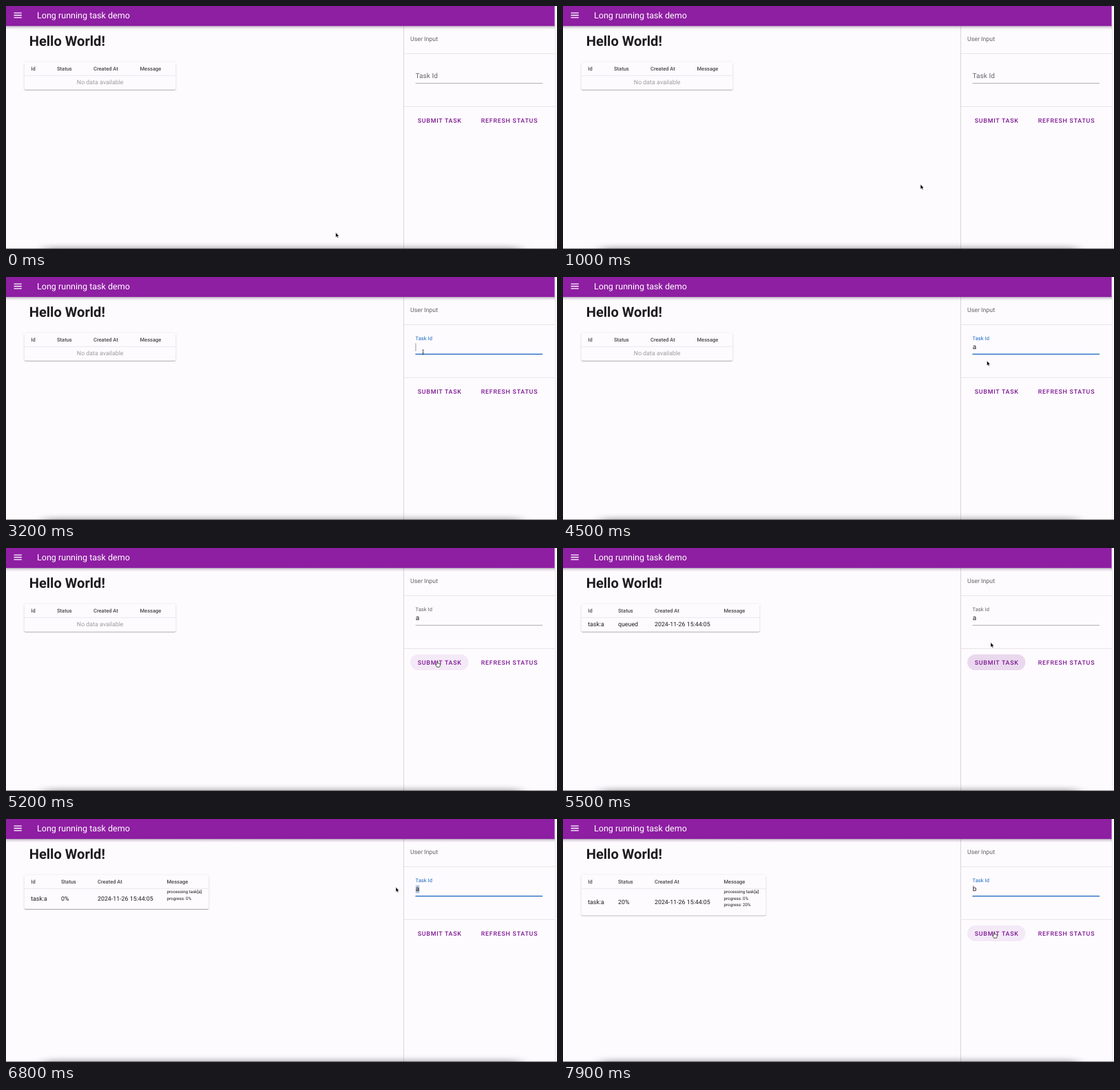
Write an HTML page that moves like this. It is 800 px wide and 354 px high and loops after 8 s.

```html
<!DOCTYPE html>
<html lang="en">
<head>
<meta charset="utf-8">
<title>Long running task demo</title>
<style>
  html, body { margin: 0; width: 100%; height: 100%; overflow: hidden; background: #fefbff; }
  svg { display: block; font: 8.82px Roboto, sans-serif; fill: #1d1b1e; text-rendering: geometricPrecision; }
  .head { font-size: 7.55px; font-weight: 500; fill: #4a474b; }
  .button { font-weight: 500; letter-spacing: .0893em; fill: #7b1690; }
  .field { font-size: 10px; letter-spacing: .0094em; }
  .message { font-size: 6.25px; }
  .rule { stroke: #e8e5e9; }
</style>
</head>
<body>
<svg width="800" height="354" viewBox="0 0 800 354">
  <defs>
    <linearGradient id="barShade" x2="0" y2="1">
      <stop stop-color="#402048" stop-opacity=".4"/>
      <stop offset=".4" stop-color="#402048" stop-opacity=".14"/>
      <stop offset="1" stop-color="#402048" stop-opacity="0"/>
    </linearGradient>
    <filter id="soft" x="-10%" y="-200%" width="120%" height="500%"><feGaussianBlur stdDeviation="10 4.5"/></filter>
    <filter id="cardShade" x="-5%" y="-20%" width="110%" height="150%">
      <feDropShadow dx="0" dy=".8" stdDeviation=".6" flood-opacity=".34"/>
      <feDropShadow dx="0" dy=".3" stdDeviation=".8" flood-opacity=".14"/>
    </filter>
  </defs>

  <rect width="800" height="354" fill="#fefbff"/>
  <rect x="797" width="3" height="354" fill="#fafafa"/>
  <path d="M797.5 0V354" stroke="#ebe9ec"/>
  <path class="rule" d="M578 69.5H797M578 146.5H797"/>
  <path d="M577.5 29V354" stroke="#d9d6da"/>
  <rect y="29" width="797" height="5.5" fill="url(#barShade)"/>
  <rect width="796.6" height="29" fill="#8e1ea2"/>
  <path d="M11.5 10.2h11.3m-11.3 3.3h11.3m-11.3 3.3h11.3" stroke="#fff" stroke-width="1.3"/>
  <text x="45" y="18.2" font-size="12.55" fill="#fff">Long running task demo</text>
  <text x="33.7" y="58" font-size="20.1" font-weight="700">Hello World!</text>

  <rect id="card" x="26.5" y="81.5" rx="2.5" fill="#fefbff" filter="url(#cardShade)"/>
  <path id="divider" class="rule" stroke-width=".8"/>
  <g id="heads" class="head">
    <text y="94.1">Id</text><text y="94.1">Status</text>
    <text y="94.1">Created At</text><text y="94.1">Message</text>
  </g>
  <text id="empty" x="136.7" y="114.3" text-anchor="middle" fill="#9d9a9e">No data available</text>
  <g id="row">
    <text x="36.2">task:a</text><text id="status" x="80"></text><text x="133">2024-11-26 15:44:05</text>
  </g>
  <g class="message">
    <text x="233.5" y="108.4">processing task[a]</text>
    <text x="233.5" y="117.8">progress: 0%</text>
    <text x="233.5" y="127.2">progress: 20%</text>
  </g>

  <text x="587" y="51.3" fill="#656267">User Input</text>
  <text id="label" class="field" x="594.5">Task Id</text>
  <path id="line" d="M594.5 112.6H779" stroke-width=".8"/>
  <path id="focusLine" stroke="#1867c0" stroke-width="1.2"/>
  <rect id="selection" x="594.7" y="96.5" width="5.6" height="11.5" fill="#b3c5dc"/>
  <text id="value" class="field" x="594.7" y="105.4"></text>
  <path id="caret" stroke="#555" stroke-width=".6"/>

  <rect id="pill" x="587" y="155" width="84.5" height="23" rx="11.5" fill="#7b1690"/>
  <text class="button" x="597.7" y="169.5">SUBMIT TASK</text>
  <text class="button" x="689.7" y="169.5">REFRESH STATUS</text>

  <rect x="55" y="352" width="692" height="20" opacity=".36" fill="#000" filter="url(#soft)"/>
  <path d="M0 353.7H800" stroke="#222" stroke-width=".7"/>

  <g id="cursor">
    <path d="M0 0V7L1.6 5.6L2.7 8L3.8 7.5L2.8 5.2H4.9Z" fill="#000" stroke="#fff" stroke-width=".5"/>
    <path d="M-1.2 -3.5Q0 -3.5 0 -2.6Q0 -3.5 1.2 -3.5M0 -2.6V2.6M-1.2 3.5Q0 3.5 0 2.6Q0 3.5 1.2 3.5M-.7 .9H.7"
          fill="none" stroke="#222" stroke-width=".7"/>
    <path d="M-.8 .5Q0 -.5 .7 .5V3Q1.5 2.5 2 3.2Q2.8 2.8 3.2 3.5Q4.2 3.3 4.3 4.3V6Q4 7.3 3.5 8.4H-.3Q-1 7 -2.4 5.3Q-2.5 4 -.8 5Z"
          fill="#fff" stroke="#111" stroke-width=".7"/>
  </g>
</svg>
<script>
const LOOP = 8000;
const FOCUS = 2100, TYPE_A = 3700, CLICK = 5200, QUEUED = 5300;
const START = 6150, REFOCUS = 6300, TYPE_B = 7200, PROGRESS = 7250;

// time, x, y
const path = [
  [0, 478.7, 330], [700, 478.7, 330], [1500, 605.5, 109.5], [4250, 605.5, 109.5],
  [4500, 615.4, 122], [5000, 626, 165], [5300, 626, 165], [5500, 621, 137.7],
  [5900, 606, 104], [6300, 606, 104], [6750, 566, 99.3], [7250, 566, 99.3],
  [7750, 626, 165], [LOOP, 626, 165]
];

const el = Object.fromEntries([...document.querySelectorAll('svg [id]')].map(e => [e.id, e]));
const messages = [...document.querySelectorAll('.message text')];
const set = (node, attrs) => Object.entries(attrs).forEach(([k, v]) => node.setAttribute(k, v));
const show = (node, on) => node.setAttribute('visibility', on ? 'visible' : 'hidden');
const mix = (a, b, p) => a + (b - a) * p;
const ramp = (t, start, length) => {
  const p = Math.min(1, Math.max(0, (t - start) / length));
  return p * p * (3 - 2 * p);
};

// Slope through a key; zero at holds and turning points.
function slope(i, axis) {
  const a = path[i - 1], b = path[i], c = path[i + 1];
  if (!a || !c || (b[axis] - a[axis]) * (c[axis] - b[axis]) <= 0) return 0;
  return (c[axis] - a[axis]) / (c[0] - a[0]);
}

function pointer(t) {
  const i = path.findIndex(k => k[0] > t) - 1;
  const a = path[i], b = path[i + 1], span = b[0] - a[0], p = (t - a[0]) / span;
  return [1, 2].map(axis =>
    mix(a[axis], b[axis], p * p * (3 - 2 * p)) +
    span * p * (1 - p) * ((1 - p) * slope(i, axis) - p * slope(i + 1, axis)));
}

function drawTable(t) {
  const queued = t >= QUEUED;
  const lines = t >= PROGRESS ? 3 : t >= START ? 2 : 0;
  const width = lines ? 268 : queued ? 259 : 220;
  const grow = lines ? (lines - 1) * 9.2 : 0;
  const columns = queued ? [36.3, 80, 133, 233.5] : [36.3, 74, 127, 194.5];
  set(el.card, { width, height: 40.3 + grow });
  set(el.divider, { d: `M26.5 101.4h${width}` });
  [...el.heads.children].forEach((node, i) => set(node, { x: columns[i] }));
  show(el.empty, !queued);
  show(el.row, queued);
  set(el.row, { transform: `translate(0 ${114.4 + grow / 2})` });
  el.status.textContent = lines === 3 ? '20%' : lines ? '0%' : 'queued';
  messages.forEach((node, i) => show(node, i < lines));
}

function drawField(t, x, hover) {
  const focused = t >= FOCUS && t < CLICK || t >= REFOCUS;
  const lift = ramp(t, FOCUS, 150);
  const reach = 92.25 * ramp(t, t < REFOCUS ? FOCUS : REFOCUS, 150);
  const value = t >= TYPE_B ? 'b' : t >= TYPE_A ? 'a' : '';
  const selecting = t > REFOCUS && t < TYPE_B && x < 602;
  set(el.label, { y: mix(105.4, 91.7, lift), fill: focused ? '#1867c0' : '#666368' });
  el.label.style.fontSize = mix(10, 7.5, lift) + 'px';
  set(el.line, { stroke: hover ? '#39363b' : '#9b989d' });
  set(el.focusLine, { d: `M${686.75 - reach} 112.4h${reach * 2}` });
  show(el.focusLine, focused);
  el.value.textContent = value;
  show(el.selection, selecting);

  const since = t - [FOCUS, TYPE_A, REFOCUS, TYPE_B].filter(k => k <= t).pop();
  set(el.caret, { d: `M${value ? 600.8 : 594.9} 96.5V108` });
  show(el.caret, focused && !selecting && since % 1000 < 500);
}

function draw() {
  const t = performance.now() % LOOP;
  const [x, y] = pointer(t);
  const overField = x > 594 && x < 779 && y > 84 && y < 114;
  const overButton = x > 587 && x < 671 && y > 155 && y < 178;
  const kind = overButton ? 2 : overField ? 1 : 0;
  drawTable(t);
  drawField(t, x, overField);

  const hover = .075 * (ramp(t, 4800, 200) - ramp(t, 5380, 200) + ramp(t, 7560, 200));
  const press = .15 * (ramp(t, CLICK, 200) - ramp(t, REFOCUS, 200));
  set(el.pill, { opacity: Math.max(hover, press) });

  set(el.cursor, { transform: `translate(${x} ${y})` });
  [...el.cursor.children].forEach((node, i) => show(node, i === kind));
  el.cursor.style.opacity = t > TYPE_A && t < 4250 ? 0 : 1;
  requestAnimationFrame(draw);
}
draw();
</script>
</body>
</html>
```
